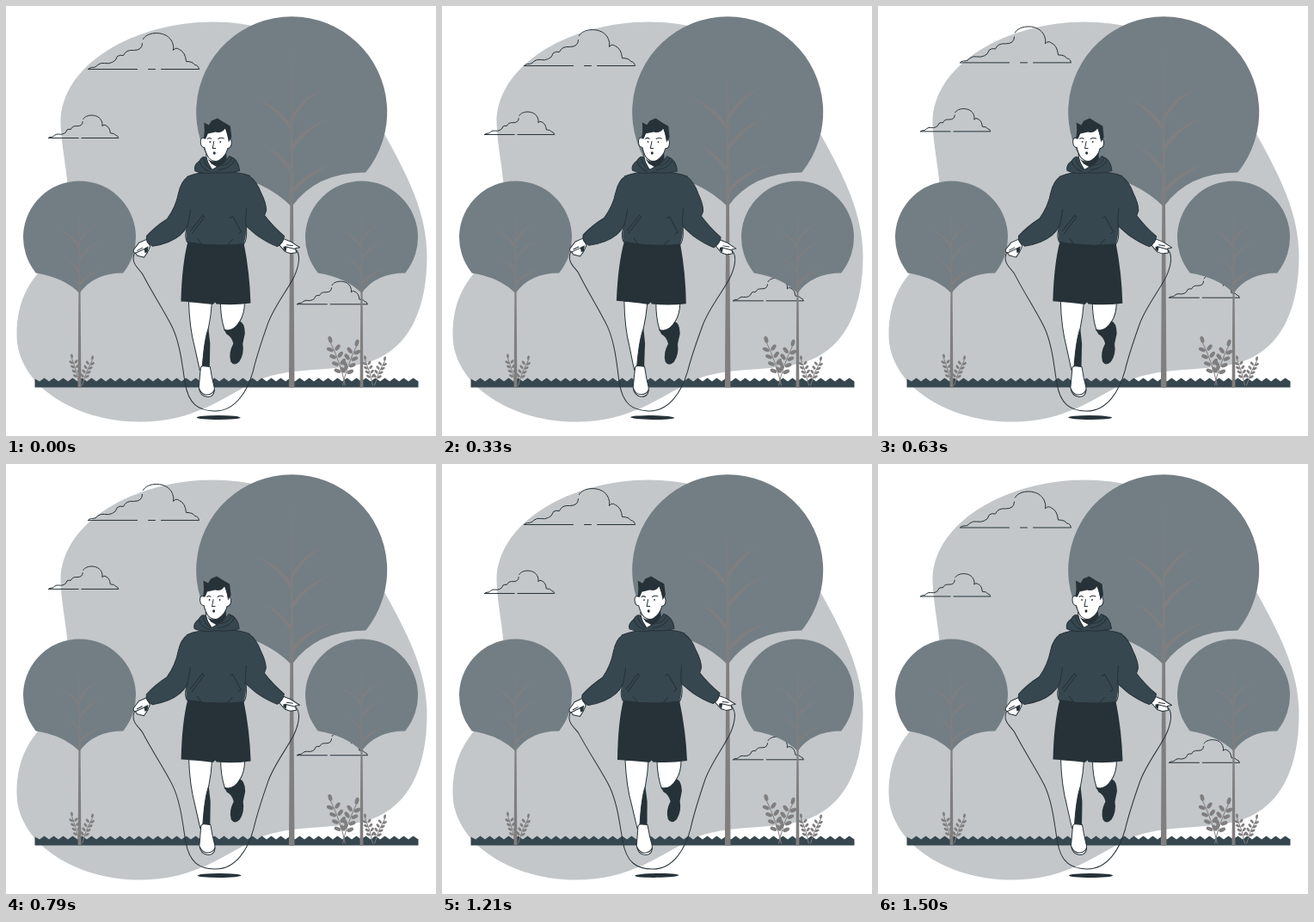
Recreate the animation shown at these times as an HTML page. Size 500 by 500 pixels, loop 1.54 s.

```html
<!DOCTYPE html>
<html lang="en">
<head>
<meta charset="utf-8">
<title>Jump rope</title>
<style>
  html, body { margin: 0; height: 100%; overflow: hidden; background: #fff; }
  svg { display: block; width: 100vw; height: 100vh; }
  .line { fill: none; stroke: #263238; stroke-width: 1; stroke-linecap: round; stroke-linejoin: round; }
  .cloud path { vector-effect: non-scaling-stroke; }
  .dark { fill: #263238; }
  .cloth { fill: #37474f; stroke: #263238; stroke-linejoin: round; }
  .skin { fill: #fff; stroke: #263238; stroke-linejoin: round; }
  .wood { fill: #807e7e; }
</style>
</head>
<body>
<svg viewBox="-.5 -.5 500 500">
  <path fill="#c3c7ca" d="M63 135C63 67 150 18 240 18C330 18 395 65 441 151C467 198 489 241 489 290C489 350 470 390 435 408C395 428 335 416 292 435C252 454 220 483 155 483C80 483 12 440 12 382C12 340 28 318 50 295C90 250 64 185 63 135Z"/>
  <g id="clouds"></g>
  <path id="ground" fill="#37474f"/>
  <g id="trees"></g>
  <g id="plants" class="wood"></g>
  <g id="man">
    <ellipse class="dark" cx="247" cy="478" rx="25.5" ry="2.4"/>
    <!-- legs -->
    <path class="dark" d="M235 374L237 392L236.500 421L227 423Q228 396 235 374Z"/>
    <path class="skin" d="M212 343Q213 374 219 396L225 423L228 420Q230 388 235 374Q238 360 239 344Z"/>
    <path class="skin" d="M226 420L228 418L237 419Q239 432 242 443Q243 454 234 454Q225 453 224 443Z"/>
    <path class="line" d="M224.500 445Q228 452 234 451.500Q240 451 242 446"/>
    <path class="skin" d="M249 344Q249 362 254 377Q266 380 271 367Q277 358 277 344Z"/>
    <path class="dark" d="M253 375Q263 379 271 366Q277 367 277.500 380L275 392Q277 404 271 413Q265 419 261 413Q258 403 264 392Q262 384 256 381Z"/>
    <path class="dark" d="M211 273L276 275Q283 310 284 345Q264 348 244 346L243 344L240 346.500Q220 344 203 343Q204 300 211 273Z"/>
    <!-- arms and rope -->
    <path class="skin" d="M163 271L154 275L148 283Q147 287 150 287L152 290L160 292L164 286L167 279Z"/>
    <path class="line" d="M150 287L163 281M152 284L158 281"/>
    <path class="dark" d="M160 282L165 279L164 286L161 287Z"/>
    <path class="skin" d="M322 270L330 273L341 280L336 281L337 286L330 287L324 285L317 277Z"/>
    <path class="line" d="M324 279L336 282M326 277L333 278"/>
    <path class="dark" d="M322 279L326 279L325 285L322 282Z"/>
    <path class="line" d="M149 287C144 298 153 304 158 311C170 334 184 355 193 373C203 394 205 422 208 438C212 463 224 470 242 470.500C267 471 281 446 287 424C292 403 298 386 304 369C311 349 328 328 335 313Q344 292 337 283"/>
    <path class="cloth" d="M211 198Q203 203 200 217Q197 233 187 247Q173 256 163 267Q161 275 170 279Q190 276 202 266Q211 258 214 246Z"/>
    <path class="cloth" d="M282 197Q291 203 296 217Q302 229 302 237L300 243Q311 257 323 267Q322 275 315 279Q304 275 291 266L276 253Z"/>
    <!-- hoodie -->
    <path fill="#37474f" d="M210 198Q228 191 245 193Q267 191 283 197Q284 222 278 250Q280 264 276 276Q243 280 210 274Q207 266 212 248Q211 222 210 198Z"/>
    <path class="line" d="M210 198Q228 191 245 193Q267 191 283 197M214 236Q213 246 209 260Q207 268 210 274Q243 280 276 276Q281 270 278 250L279 234"/>
    <path class="line" d="M214 261L228 243L230 245L216 264M260 246L263 244L273 262L270 264M222 270L227 276M263 271L257 277"/>
    <!-- head -->
    <path class="skin" d="M232 172L234 188L240 192L250 186L255 172Z"/>
    <path class="dark" d="M233 176Q242 187 255 168L256 177L247 188L238 183Z"/>
    <path class="skin" d="M230 153Q225 152 225.500 158Q226 164 230 164Q232 172 235 176Q241 182 247 179Q255 174 257 165Q261.500 165 261.500 158Q261 153 258 154L255 141L233 144Z"/>
    <path class="dark" d="M229 154L230 145L229.500 135L235 138L238 133L245 130L253 135L260 139L261.500 152L258 158L257 150L254 142Q250 148 243 146L234 148L231.500 154Z"/>
    <path class="line" d="M233.500 154Q236 152 238 154M246 154Q249 152 252.500 153.500M241 157L239.500 165H243"/>
    <circle class="dark" cx="236.500" cy="157.500" r=".9"/>
    <circle class="dark" cx="248.500" cy="157.500" r=".9"/>
    <ellipse class="dark" cx="241.500" cy="170.500" rx="1.500" ry="1.700"/>
    <!-- hood -->
    <path class="cloth" d="M219 191Q217 185 224 180Q228 173 232 176Q234 183 239 190L246 186Q254 182 259 174Q270 178 271 191Q258 195 245 193Q230 196 219 191Z"/>
    <path class="line" d="M224 180Q227 189 236 192M229 177Q231 186 238 190M246 190Q260 189 265 179M250 185Q259 184 262 176"/>
  </g>
</svg>
<script>
const LOOP = 1540, LEAD = 40;
const el = id => document.getElementById(id);

// Clouds: x, base y, scale, base line
const outline = 'M0 0C3-4 8 0 11-5Q15-8 19-7Q24-6 28-8Q32-9 34-15Q37-17 41-16Q44-23 53-22Q63-22 63-30M64-35C68-44 92-46 98-31Q100-27 99-22Q102-26 106-23Q113-20 114-9Q122-9 124-5Q128-5 129 0';
const gapped = 'M0 0H57M70 0H78M85 0H128', split = 'M0 0H55M61 0H128';
el('clouds').innerHTML = [[95, 73.5, 1, gapped], [49, 153.5, .63, split], [338, 346.8, .635, split]]
  .map(([x, y, s, base]) => `<g class="line cloud" transform="translate(${x} ${y}) scale(${s})"><path d="${outline}${base}"/></g>`).join('');

// Ground with a zigzag edge
let edge = 'M33 443V433';
for (let x = 33; x < 473; x += 11) edge += `L${x + 5.5} 436L${x + 11} 432`;
el('ground').setAttribute('d', edge + 'L479 436V443Z');

// Trees: branches as [trunk y, tip x, tip y]
const branches = [[18, -42, -15], [6, 38, -27], [41, 44, 8], [68, -32, 40], [91, 46, 62]];
const crown = 'M0 111Q-30 80-86 71A111 111 0 1 1 86 71Q28 71 0 111Z';
const tree = (x, y, s) => {
  const foot = (443 - y) / s;
  const twigs = branches.map(([h, tx, ty]) =>
    `M0 ${h}Q${tx * .35} ${ty + 9} ${tx} ${ty}Q${tx * .4} ${ty + 12} 0 ${h + 6}Z`).join('');
  return `<g transform="translate(${x} ${y}) scale(${s})"><path fill="#737e84" d="${crown}"/>
    <path class="wood" d="M0-80L1.800 105L3.300 ${foot}H-3.300L-1.800 105Z${twigs}"/></g>`;
};
el('trees').innerHTML = tree(331.7, 122, 1) + tree(85, 268, .59) + tree(413, 268, .59);

// A frond bends from its root to its tip, with paired leaves
const frond = (x, y, dx, dy, s) => {
  let out = `<path fill="none" stroke="#807e7e" d="M${x} ${y}q${dx * .3} ${dy * .5} ${dx} ${dy}"/>`;
  for (let i = 0; i < 5; i++) {
    const k = .3 + i * .165;
    const px = x + dx * (.6 * k * (1 - k) + k * k), py = y + dy * k;
    for (const side of i < 4 ? [-1, 1] : [0])
      out += `<ellipse cx="${4.6 * s}" rx="${3.3 * s}" ry="${1.8 * s}" transform="translate(${px} ${py}) rotate(${-90 + dx * .9 + side * 52})"/>`;
  }
  return out;
};
el('plants').innerHTML =
  frond(85, 441, -9, -32, .8) + frond(88, 441, 12, -30, .8) +
  frond(394, 441, -17, -50, 1.25) + frond(391, 441, 16, -46, 1.25) +
  frond(426, 441, -9, -30, .8) + frond(428, 441, 12, -29, .8);

// Triangle wave: 1 at phase 0, -1 at phase .5
const wave = p => Math.abs((p % 1) * 4 - 2) - 1;

function draw(now) {
  const p = (now + LEAD) / LOOP;
  el('clouds').setAttribute('transform', `translate(0 ${(wave(p) - 1) * 4.65})`);
  el('man').setAttribute('transform', `rotate(${wave(p + .75)} 244.500 305.500)`);
  requestAnimationFrame(draw);
}
requestAnimationFrame(draw);
</script>
</body>
</html>
```
